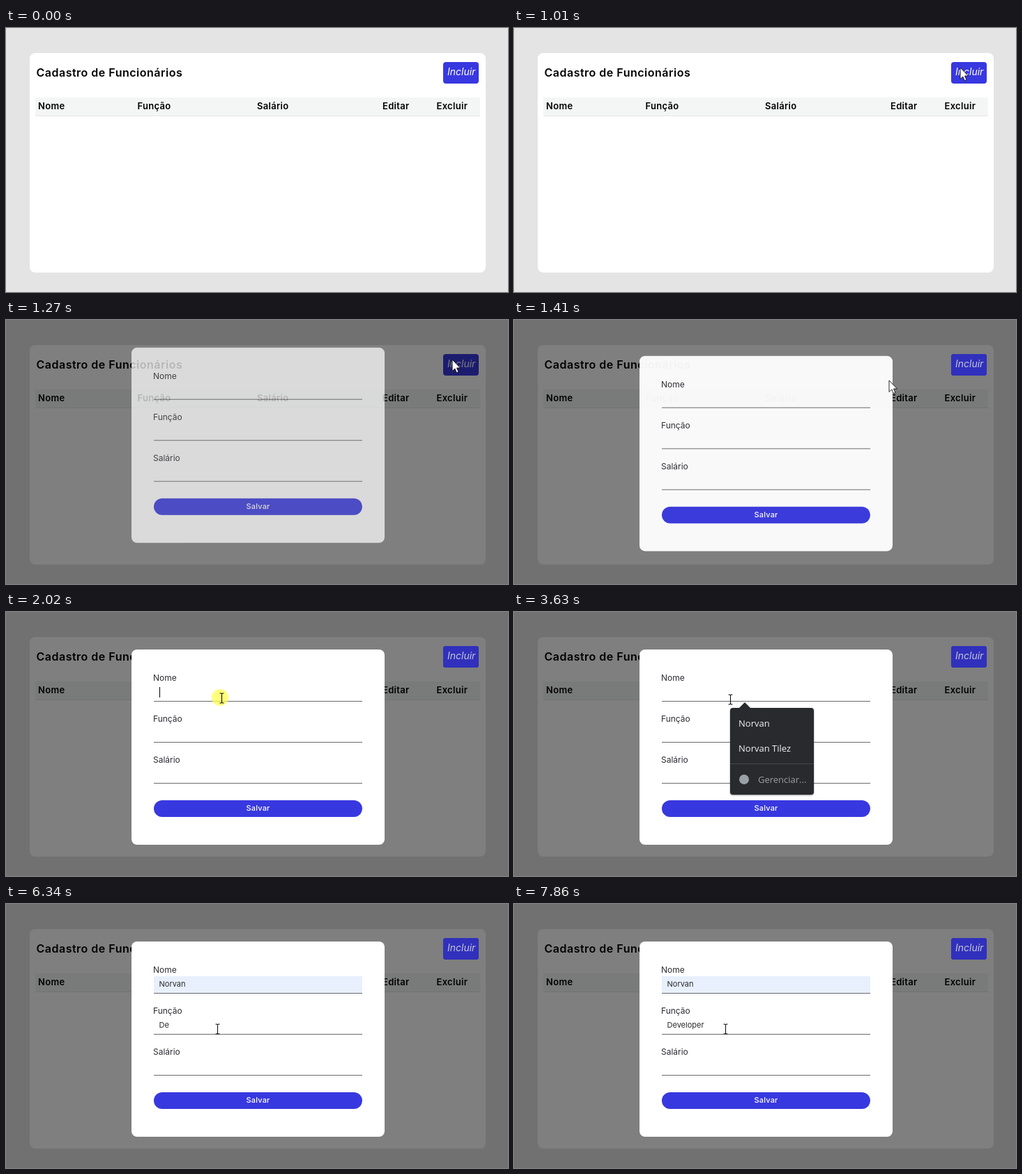
An HTML page for the animation above (7.99 s loop, 720 by 380 pixels).

```html
<!DOCTYPE html>
<html lang="pt-BR">
<head>
<meta charset="utf-8">
<title>Cadastro de Funcionários</title>
<style>
  html, body { margin: 0; width: 100%; height: 100%; overflow: hidden; background: #e4e4e4; }
  svg { display: block; width: 720px; height: 380px; font-family: Inter, sans-serif; }
  .title { font-size: 16px; font-weight: 600; letter-spacing: .5px; }
  .head { font-size: 13px; font-weight: 600; letter-spacing: .3px; }
  .label { font-size: 12px; fill: #2c2c34; }
  .value { font-size: 11px; fill: #2a2a2a; }
  .save { font-size: 11px; font-weight: 500; letter-spacing: .2px; fill: #fff; text-anchor: middle; }
  .add { font-size: 14px; font-style: italic; fill: #fff; }
  .add.dim { fill: #c4c4d4; }
  .menu { font: 13px "Open Sans", "Noto Sans", sans-serif; fill: #f1f3f4; }
  .menu .muted { fill: #9aa0a6; }
  .line { fill: #6b6b6b; }
</style>
</head>
<body>
<svg viewBox="0 0 720 380">
  <rect width="720" height="380" fill="#e4e4e4"/>
  <rect x="34" y="36" width="654" height="316" rx="8" fill="#fff"/>
  <text class="title" x="43.5" y="70">Cadastro de Funcionários</text>
  <rect x="42" y="100" width="638" height="26" fill="#f4f5f5"/>
  <rect x="42" y="126" width="638" height="1" fill="#e6e6e6"/>
  <g class="head">
    <text x="46" y="117">Nome</text>
    <text x="188.5" y="117">Função</text>
    <text x="360" y="117">Salário</text>
    <text x="540" y="117">Editar</text>
    <text x="617.5" y="117">Excluir</text>
  </g>
  <g id="addUnder">
    <rect x="627" y="49" width="51" height="31" rx="4" fill="#3838e0"/>
    <text class="add" x="633" y="68">Incluir</text>
  </g>

  <rect id="overlay" width="720" height="380" fill="#000" opacity=".5"/>
  <g id="addOver">
    <rect x="627" y="49" width="51" height="31" rx="4" fill="#3030bc"/>
    <text class="add dim" x="633" y="68">Incluir</text>
  </g>

  <g id="modal">
    <rect x="180" y="54" width="363" height="281" rx="8" fill="#fff"/>
    <rect id="autofill" x="212" y="104" width="299" height="24" fill="#e8f0fe"/>
    <g class="label">
      <text x="211" y="99">Nome</text>
      <text x="211" y="158">Função</text>
      <text x="211" y="217">Salário</text>
    </g>
    <rect class="line" x="212" y="128" width="299" height="1"/>
    <rect class="line" x="212" y="187" width="299" height="1"/>
    <rect class="line" x="212" y="246" width="299" height="1"/>
    <text class="value" id="nameValue" x="219.5" y="119"></text>
    <text class="value" id="roleValue" x="219.5" y="178"></text>
    <rect id="caret" width="1" height="15"/>
    <rect x="212" y="271" width="299" height="24" rx="12" fill="#3838e0"/>
    <text class="save" x="361.5" y="286">Salvar</text>
  </g>

  <g id="menu" class="menu">
    <rect x="309" y="138" width="122" height="127" rx="5" fill="#000" opacity=".18"/>
    <path d="M322 139L331 130L340 139Z" fill="#292a2d"/>
    <rect x="310" y="138" width="120" height="125" rx="4" fill="#292a2d"/>
    <rect id="hover" x="310" y="142" width="120" height="36" fill="#3f4043"/>
    <text x="322" y="165">Norvan</text>
    <text x="322" y="201">Norvan Tilez</text>
    <rect x="310" y="218" width="120" height="1" fill="#46474b"/>
    <circle cx="330" cy="241" r="7" fill="#9aa0a6"/>
    <text class="muted" x="350" y="246">Gerenciar...</text>
  </g>

  <circle id="click" r="12" fill="#ffff50" opacity=".75"/>
  <path id="arrow" d="M0 0V16.5L3.8 13L6.3 18.8L9 17.6L6.5 12H11.5Z" fill="#fff" stroke="#111" stroke-width=".9"/>
  <path id="beam" d="M-3 -7H-1L0 -6L1 -7H3M0 -6V6M-3 7H-1L0 6L1 7H3" fill="none" stroke="#111" stroke-width="1.1"/>
</svg>
<script>
const LOOP = 7990, STEP = 66.58;
const el = Object.fromEntries([...document.querySelectorAll('[id]')].map(n => [n.id, n]));

// time, x, y of the pointer
const path = [
  [170, 686, 352], [330, 672, 200], [480, 652, 62], [560, 645, 39], [639, 640, 57],
  [1305, 640, 57], [1571, 436, 116], [1970, 309, 124], [2027, 309, 124], [2094, 310, 126],
  [3640, 310, 126], [3900, 337, 160], [4040, 337, 160], [4300, 309, 174],
  [4505, 309, 174], [4635, 303, 180]
];
const beamTimes = [[1540, 3690], [4160, LOOP]];
const clicks = [[810, 880], [2020, 2090], [3960, 4030], [4330, 4470]];
const nameCaret = [[2020, 2550], [3100, 3630], [4030, 4330]];
const roleCaret = [[4330, 4860], [5390, 6340], [6540, 7860]];
const keyTimes = [5610, 5810, 6540, 6610, 6740, 7000, 7070, 7270, 7330];

const within = (t, spans) => spans.some(([a, b]) => t >= a && t < b);
const show = (node, on) => { node.style.display = on ? '' : 'none'; };
const place = (node, x, y) => node.setAttribute('transform', `translate(${x} ${y})`);
const write = (node, s) => { if (node.textContent !== s) node.textContent = s; };

function pointerAt(t) {
  const i = path.findIndex(p => p[0] > t);
  if (i < 0) return path[path.length - 1].slice(1);
  if (i === 0) return path[0].slice(1);
  const [a, b] = [path[i - 1], path[i]];
  const k = (t - a[0]) / (b[0] - a[0]);
  return [1, 2].map(j => a[j] + (b[j] - a[j]) * k);
}

// CSS "ease", cubic-bezier(.25, .1, .25, 1)
function ease(x) {
  if (x <= 0 || x >= 1) return x <= 0 ? 0 : 1;
  const bez = (p, q, s) => 3 * p * s * (1 - s) ** 2 + 3 * q * s * s * (1 - s) + s ** 3;
  let lo = 0, hi = 1;
  for (let i = 0; i < 24; i++) {
    const mid = (lo + hi) / 2;
    if (bez(.25, .25, mid) < x) lo = mid; else hi = mid;
  }
  return bez(.1, 1, lo);
}

function draw(t) {
  const moveTime = Math.floor((t + 6) / STEP) * STEP + 40;

  show(el.overlay, t >= 1070);
  show(el.addOver, t >= 1410);
  const open = ease((moveTime - 1123) / 430);
  show(el.modal, open > 0);
  el.modal.setAttribute('opacity', open);
  place(el.modal, 0, -50 * (1 - open));

  show(el.menu, t >= 2090 && t < 4030);
  show(el.hover, t >= 3830);
  show(el.autofill, t >= 3830);
  write(el.nameValue, t >= 3830 ? 'Norvan' : '');
  write(el.roleValue, 'Developer'.slice(0, keyTimes.filter(k => t >= k).length));

  const inRole = t >= 4330;
  const field = inRole ? el.roleValue : el.nameValue;
  const caretOn = within(t, inRole ? roleCaret : nameCaret);
  show(el.caret, caretOn);
  if (caretOn) {
    const width = field.textContent ? field.getComputedTextLength() : 0;
    place(el.caret, Math.round(219.6 + width), inRole ? 167 : 108);
  }

  const [x, y] = pointerAt(moveTime).map(Math.round);
  const beam = within(t, beamTimes);
  show(el.arrow, t >= 130 && !beam);
  show(el.beam, beam);
  place(el.arrow, x, y);
  place(el.beam, x + .5, y);
  show(el.click, within(t, clicks));
  place(el.click, x - 2, y - 1);
}

const start = performance.now();
function tick() {
  draw((performance.now() - start) % LOOP);
  requestAnimationFrame(tick);
}
tick();
</script>
</body>
</html>
```
